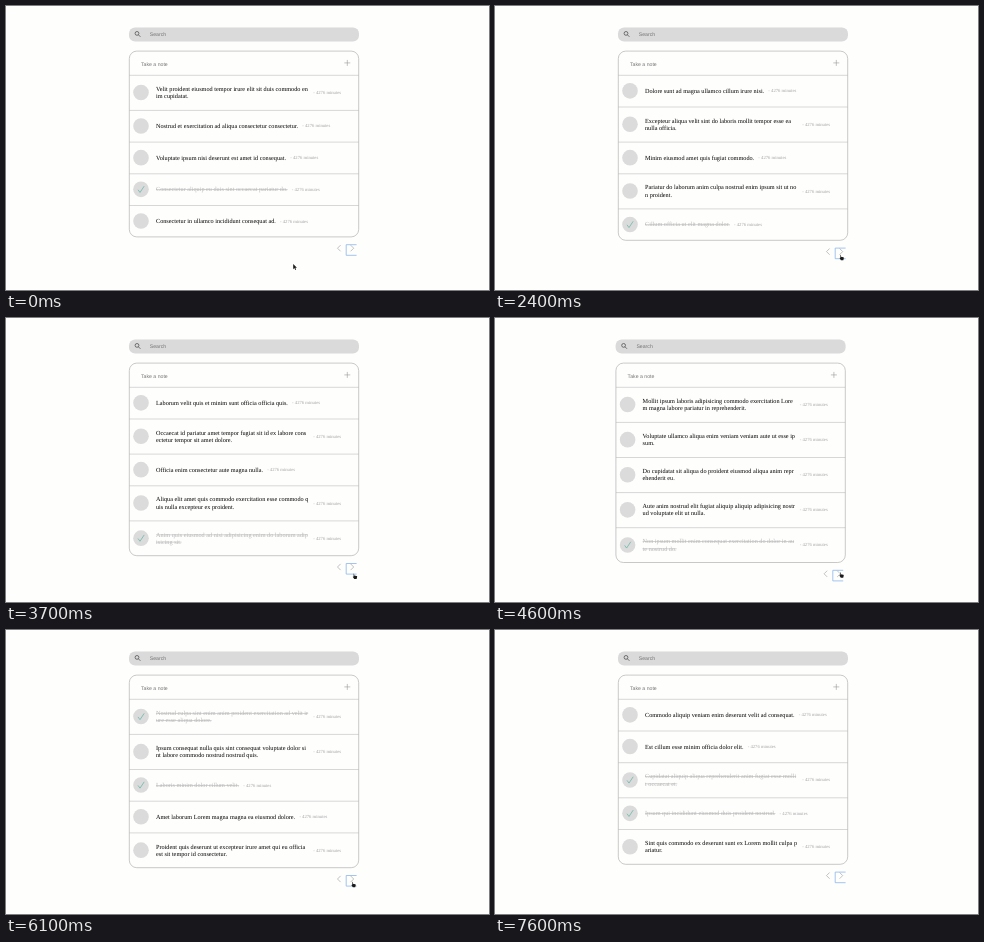
Recreate the animation shown at these times as an HTML page. Size 483x284 px, loop 8000 ms.

```html
<!DOCTYPE html>
<html lang="en">
<head>
<meta charset="utf-8">
<title>Note list</title>
<style>
html, body { margin: 0; width: 100%; height: 100%; overflow: hidden; background: #fefefd; }
svg { display: block; width: 483px; height: 284px; }
text { text-rendering: geometricPrecision; white-space: pre; }
.ui { font: 5.18px "Liberation Sans", Arial, sans-serif; fill: #757575; }
.note { font: 6.22px "Liberation Serif", "Times New Roman", serif; fill: #000; }
.done { fill: #b8b8b8; text-decoration: line-through; }
.age { font: 4.66px "Liberation Serif", "Times New Roman", serif; fill: #a4a4a4; }
.line { fill: none; stroke: #c6c7c6; stroke-width: .7; }
.card { fill: none; stroke: #b2b2b2; stroke-width: .7; }
.icon { fill: none; stroke: #999; stroke-width: .6; }
.check { fill: none; stroke: #5db3a4; stroke-width: .7; }
.focus { fill: none; stroke: #8bb5ec; stroke-width: .8; }
</style>
</head>
<body>
<svg viewBox="0 0 483 284">
  <g id="app">
    <rect x="123" y="21.4" width="230" height="14.1" rx="6" fill="#d9dad9"/>
    <g fill="none" stroke="#555" stroke-width=".8">
      <circle cx="131" cy="27.4" r="1.9"/>
      <path d="M132.4 28.8l2 2"/>
    </g>
    <text class="ui" x="143.8" y="30">Search</text>
    <text class="ui" x="135" y="60">Take a note</text>
    <path class="icon" d="M338.3 56.9h6M341.3 53.9v6"/>
    <g id="list"></g>
  </g>
  <path id="cursor" fill="#1a1a1a" stroke="#fff" stroke-width=".3" paint-order="stroke"/>
</svg>
<script>
const LOOP = 8000, STEP = 100;
const TOP = 69, SINGLE = 31.7, DOUBLE = 35.1;
const LEAVE = 7500, GONE = 7600, HOVER = 1800;

// "*" marks a finished note, "|" a line break
const pages = [
  { at: 0, notes: [
    "Velit proident eiusmod tempor irure elit sit duis commodo en|im cupidatat.",
    "Nostrud et exercitation ad aliqua consectetur consectetur.",
    "Voluptate ipsum nisi deserunt est amet id consequat.",
    "*Consectetur aliquip eu duis sint occaecat pariatur do.",
    "Consectetur in ullamco incididunt consequat ad."] },
  { at: 2100, notes: [
    "Dolore sunt ad magna ullamco cillum irure nisi.",
    "Excepteur aliqua velit sint do laboris mollit tempor esse ea|nulla officia.",
    "Minim eiusmod amet quis fugiat commodo.",
    "Pariatur do laborum anim culpa nostrud enim ipsum sit ut no|n proident.",
    "*Cillum officia ut elit magna dolor."] },
  { at: 3000, notes: [
    "Consequat in laboris sunt occaecat aute ad sint pariatur irure|nostrud aute Lorem.",
    "Eu do voluptate consequat occaecat ea ullamco quis in labori|s aliqua culpa.",
    "*Eu aliqua quis pariatur in.",
    "In consectetur aliquip do tempor aliqua mollit do eiusmod cu|lpa qui labore do.",
    "*Pariatur est aliquip labore reprehenderit aute esse deserunt d|olor eiusmod."] },
  { at: 3500, notes: [
    "Laborum velit quis et minim sunt officia officia quis.",
    "Occaecat id pariatur amet tempor fugiat sit id ex labore cons|ectetur tempor sit amet dolore.",
    "Officia enim consectetur aute magna nulla.",
    "Aliqua elit amet quis commodo exercitation esse commodo q|uis nulla excepteur ex proident.",
    "*Anim quis eiusmod ad nisi adipisicing enim do laborum adip|isicing sit."] },
  { at: 4600, shift: -2.4, notes: [
    "Mollit ipsum laboris adipisicing commodo exercitation Lore|m magna labore pariatur in reprehenderit.",
    "Voluptate ullamco aliqua enim veniam veniam aute ut esse ip|sum.",
    "Do cupidatat sit aliqua do proident eiusmod aliqua anim repr|ehenderit eu.",
    "Aute anim nostrud elit fugiat aliquip aliquip adipisicing nostr|ud voluptate elit ut nulla.",
    "*Non ipsum mollit enim consequat exercitation do dolor in au|te nostrud do."] },
  { at: 5300, notes: [
    "Tempor sint ex labore magna duis velit consequat ad culpa e|st ullamco.",
    "Irure nulla fugiat sit anim commodo.",
    "Deserunt aliqua ea nisi mollit enim dolore amet cillum veni|am officia.",
    "*Esse quis minim laboris ut proident.",
    "Sunt occaecat elit do nostrud ipsum pariatur eiusmod qui te|mpor id."] },
  { at: 6100, notes: [
    "*Nostrud culpa sint enim anim proident exercitation ad velit ir|ure esse aliqua dolore.",
    "Ipsum consequat nulla quis sint consequat voluptate dolor si|nt labore commodo nostrud nostrud quis.",
    "*Laboris minim dolor cillum velit.",
    "Amet laborum Lorem magna magna ea eiusmod dolore.",
    "Proident quis deserunt ut excepteur irure amet qui eu officia|est sit tempor id consectetur."] },
  { at: 7500, notes: [
    "Commodo aliquip veniam enim deserunt velit ad consequat.",
    "Est cillum esse minim officia dolor elit.",
    "*Cupidatat aliquip aliqua reprehenderit anim fugiat esse molli|t occaecat et.",
    "*Ipsum qui incididunt eiusmod duis proident nostrud.",
    "Sint quis commodo ex deserunt sunt ex Lorem mollit culpa p|ariatur."] }
];

// The pointer swings in on a curve, then makes short eased moves over the button
const swing = { from: 200, to: 1100, x: [287.2, 240, 290, 333], y: [258, 250, 162, 246.5] };
const moves = [
  { from: 1600, to: 1800, x: 342, y: 244.8 },
  { from: 2000, to: 2700, x: 346, y: 251.3 },
  { from: 3400, to: 3700, x: 346.7, y: 255.5 },
  { from: 3800, to: 4100, x: 343, y: 257 },
  { from: 4200, to: 4600, x: 344.3, y: 254.2 },
  { from: 4800, to: 5100, x: 342, y: 258 },
  { from: 5200, to: 5900, x: 345.3, y: 251.8 }
];
const ARROW = "M0 0V5.2L1.2 4.1 2 5.9 2.9 5.5 2.1 3.8H3.7Z";
const HAND = "M.9 0Q1.5 0 1.5 .8V2L4 2.5Q4.7 2.7 4.4 3.6L3.9 5.5H1.5L0 3.2 .9 2.9Z";

const $ = id => document.getElementById(id);
const app = $("app"), list = $("list"), cursor = $("cursor");

const progress = (t, { from, to }) => Math.min(1, Math.max(0, (t - from) / (to - from)));
const smooth = p => p * p * (3 - 2 * p);
const bezier = ([a, b, c, d], p, q = 1 - p) =>
  q * q * q * a + 3 * q * q * p * b + 3 * q * p * p * c + p * p * p * d;

function row(note, mid) {
  const done = note[0] === "*";
  const lines = note.replace("*", "").split("|");
  const span = (s, y) => `<tspan class="note ${done ? "done" : ""}" x="150" y="${y}">${s}</tspan>`;
  const age = pos => `<tspan class="age" ${pos}>- 4276 minutes</tspan>`;
  const body = lines.length > 1
    ? span(lines[0], mid - 1.6) + span(lines[1], mid + 5.6) + age(`x="307.2" y="${mid + 1.5}"`)
    : span(lines[0], mid + 2) + age('dx="4.2" dy="-.5"');
  const check = done ? `<path class="check" d="M132 ${mid + .4}l2 2.7 4.2-6.3"/>` : "";
  return `<circle cx="135" cy="${mid}" r="7.8" fill="#dadbda"/>${check}<text>${body}</text>`;
}

function drawPage({ notes, shift = 0 }) {
  let y = TOP, html = "";
  for (const note of notes) {
    const h = note.includes("|") ? DOUBLE : SINGLE;
    html += `<path class="line" d="M123.3 ${y + .3}H352.7"/>` + row(note, y + h / 2);
    y += h;
  }
  html += `<rect class="card" x="123.3" y="45.1" width="229.4" height="${y - 45.1}" rx="7.5"/>
    <path class="icon" d="M334.6 ${y + 8.2}l-3.1 3.1 3.1 3.1M344.6 ${y + 8.2}l3.1 3.1-3.1 3.1"/>
    <path class="focus" d="M350.6 ${y + 7.8}H340.2v10.6H350.6"/>`;
  list.innerHTML = html;
  app.setAttribute("transform", `translate(${shift})`);
}

function cursorAt(t) {
  if (t >= LEAVE) return [391.5, 59.5];
  const p = progress(t, swing);
  let x = bezier(swing.x, p), y = bezier(swing.y, p);
  for (const move of moves) {
    const k = smooth(progress(t, move));
    x += (move.x - x) * k;
    y += (move.y - y) * k;
  }
  return [x, y];
}

let shown;
function draw(now) {
  const t = Math.floor(now % LOOP / STEP) * STEP;
  const page = pages.filter(p => p.at <= t).pop();
  if (page !== shown) drawPage(shown = page);
  cursor.setAttribute("d", t >= HOVER && t < LEAVE ? HAND : ARROW);
  cursor.setAttribute("transform", `translate(${cursorAt(t)})`);
  cursor.setAttribute("visibility", t < GONE ? "visible" : "hidden");
}

const start = performance.now();
function tick() {
  draw(performance.now() - start);
  requestAnimationFrame(tick);
}
tick();
</script>
</body>
</html>
```
